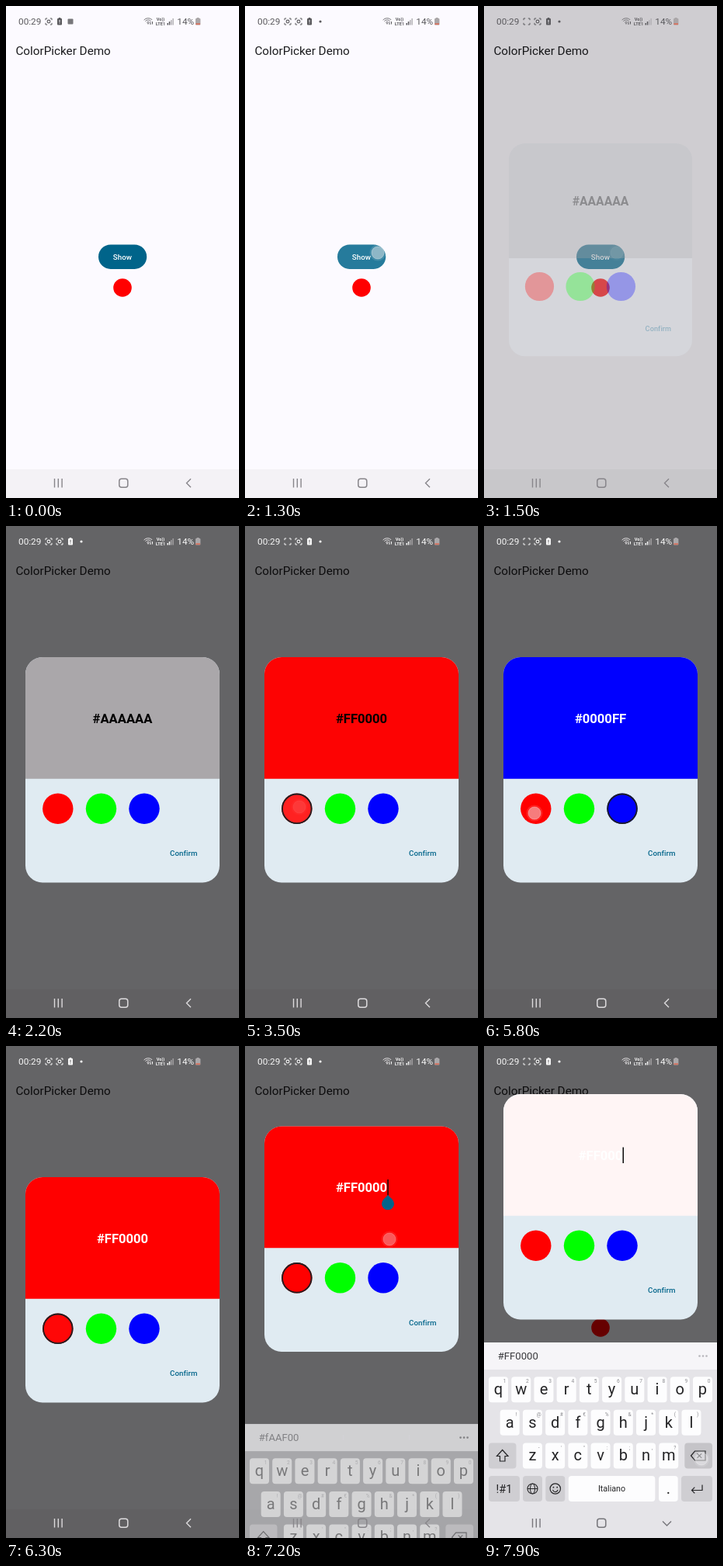
Animation, 300 px wide and 634 px high, one loop 8000 ms. Source, as an HTML page with a canvas:

```html
<!DOCTYPE html>
<html lang="en">
<head>
<meta charset="utf-8">
<title>Color picker</title>
<style>
html, body { margin: 0; width: 100%; height: 100%; overflow: hidden; background: #fcfaff; }
canvas { display: block; width: 300px; height: 634px; }
</style>
</head>
<body>
<canvas id="stage"></canvas>
<script>
const W = 300, H = 634, LOOP = 8000;
const canvas = document.getElementById('stage');
const ratio = window.devicePixelRatio || 1;
canvas.width = W * ratio;
canvas.height = H * ratio;
const c = canvas.getContext('2d');

const PRIMARY = '#00648a';
const RED = [255, 0, 0], BLUE = [0, 0, 255], GRAY = [170, 167, 170], WHITE = [255, 255, 255];
const DOTS = ['#ff0000', '#00ff00', '#0000ff'];
const DOT_X = [66.8, 122.5, 178];

// Each pick: start time, header colour, label, selected dot, label colour
const PICKS = [
  [0, GRAY, '#AAAAAA', -1, '#000'],
  [3350, RED, '#FF0000', 0, '#000'],
  [4650, BLUE, '#0000FF', 2, '#fff'],
  [5950, RED, '#FF0000', 0, '#fff'],
  [7770, WHITE, '#FF000', -1, '#fff']
];
const TAPS = [
  [1200, 171, 318], [3200, 70, 362], [4500, 180, 366],
  [5800, 65, 370], [7000, 186, 249], [7800, 280, 532]
];

const clamp = v => Math.max(0, Math.min(1, v));
const mix = (a, b, k) => a + (b - a) * k;
const rgb = a => `rgb(${a.map(Math.round).join(',')})`;

// Piecewise value sampled every 100 ms from a start time
function track(t, start, vals) {
  const p = (t - start) / 100;
  if (p < 0) return 0;
  const i = Math.floor(p);
  if (i >= vals.length - 1) return vals[vals.length - 1];
  return mix(vals[i], vals[i + 1], p - i);
}

// Critically damped spring: share of the way left
function springLeft(ms) {
  const x = 38.7 * ms / 1000;
  return (1 + x) * Math.exp(-x);
}

function text(s, x, y, size, color, weight = 400, align = 'left', spacing = 0) {
  c.font = `${weight} ${size}px Roboto, sans-serif`;
  c.letterSpacing = spacing + 'px';
  c.textAlign = align;
  c.fillStyle = color;
  c.fillText(s, x, y);
}
function rect(x, y, w, h, color) {
  c.fillStyle = color;
  c.fillRect(x, y, w, h);
}
function round(x, y, w, h, r, color) {
  c.beginPath();
  c.roundRect(x, y, w, h, r);
  c.fillStyle = color;
  c.fill();
}
function disc(x, y, r, color) {
  c.beginPath();
  c.arc(x, y, r, 0, 7);
  c.fillStyle = color;
  c.fill();
}
function ring(x, y, r, color, lw, a = 0, b = 2 * Math.PI) {
  c.beginPath();
  c.arc(x, y, r, a, b);
  stroke(color, lw);
}
function stroke(color, lw) {
  c.strokeStyle = color;
  c.lineWidth = lw;
  c.stroke();
}
function line(pts, color, lw, closed) {
  c.beginPath();
  for (let i = 0; i < pts.length; i += 2) c.lineTo(pts[i], pts[i + 1]);
  if (closed) c.closePath();
  stroke(color, lw);
}
function faded(alpha, draw) {
  c.save();
  c.globalAlpha *= alpha;
  draw();
  c.restore();
}

function captureIcon(x, col, dot) {
  for (const sx of [-1, 1]) for (const sy of [-1, 1]) {
    line([x + sx * 1.8, 20 + sy * 4, x + sx * 4, 20 + sy * 4, x + sx * 4, 20 + sy * 1.8], col, 1);
  }
  if (dot) ring(x, 20, 1.9, col, 1.1);
}
function batteryIcon(x, col, mark) {
  round(x - 3, 16, 6, 8.5, 1, col);
  rect(x - 1.3, 15, 2.6, 1.5, col);
  rect(x - 0.5, 18, 1, 2.8, mark);
  rect(x - 0.5, 21.6, 1, 1, mark);
}

function statusBar(t, dark) {
  const col = dark ? '#f6f6f6' : '#5b5a5e';
  const soft = dark ? '#e2e0e2' : '#77767a';
  const back = dark ? '#656366' : '#fcfaff';
  text('00:29', 16, 24, 11.8, col);
  const shift = 14 * track(t, 0, [0, 0.35, 0.8, 1]);
  const blink = t % 1000 < 500;
  captureIcon(55, col, blink);
  if (shift) faded(shift / 14, () => captureIcon(69, col, true));
  batteryIcon(69 + shift, col, back);
  if (shift < 14) faded(1 - shift / 14, () => round(79.5 + shift, 16.5, 7, 7, 1, soft));
  else disc(97, 20, 1.6, col);

  for (const r of [2.5, 5, 7.3]) ring(183, 23, r, soft, 1, -2.4, -0.75);
  disc(183, 22.5, 1, soft);
  line([186, 24, 186, 20.5], col, 1);
  line([188.5, 20, 188.5, 23.5], col, 1);
  text('Vo))', 199, 19.3, 5.6, col, 700, 'center');
  text('LTE1', 199, 25, 5.6, col, 700, 'center');
  for (let i = 0; i < 4; i++) {
    rect(207.5 + i * 2.3, 22 - i * 2, 1.5, 2.5 + i * 2, i < 2 ? col : (dark ? '#a09ea0' : '#b4b2b6'));
  }
  text('14%', 220.3, 24, 11.8, col);
  round(244, 16, 6.4, 8.6, 1, dark ? '#aaa8aa' : '#aaa6a8');
  rect(245.6, 15, 3, 1.4, dark ? '#aaa8aa' : '#aaa6a8');
  rect(244.4, 22.3, 5.6, 1.8, '#d9705c');
}

function navIcons(col, down) {
  for (const x of [62.5, 67.3, 72.1]) line([x, 609, x, 620.5], col, 1.4);
  c.beginPath();
  c.roundRect(145.8, 609.2, 11, 11, 3);
  stroke(col, 1.5);
  if (down) line([230, 612.5, 235.5, 618, 241, 612.5], col, 1.4);
  else line([238, 609.3, 232.5, 614.8, 238, 620.3], col, 1.4);
}

function page(t) {
  rect(0, 0, W, H, '#fcfaff');
  rect(0, 597, W, 37, '#f4f2f6');
  text('ColorPicker Demo', 12.4, 63, 15.28, '#1b1b1e');
  round(119, 307.5, 62.2, 31.4, 15.7, PRIMARY);
  const press = track(t, 1200, [0.08, 0.15, 0.12, 0]);
  if (press) round(119, 307.5, 62.2, 31.4, 15.7, `rgba(255,255,255,${press})`);
  text('Show', 150, 326.8, 9.72, '#fff', 500, 'center', 0.07);
  disc(150, 363, 11.8, '#ff0000');
}

function dialog(t) {
  const k = PICKS.findLastIndex(p => t >= p[0]);
  const [start, color, label, selected, ink] = PICKS[k];
  const from = PICKS[Math.max(0, k - 1)][1];
  const left = springLeft(t - start);
  const head = color.map((v, i) => mix(v, from[i], left));
  const x = 25, y = 169, w = 250, h = 290.5, r = 22;

  round(x, y, w, h, r, '#e0ebf2');
  round(x, y, w, 156.7, [r, r, 0, 0], rgb(head));
  text(label, 150, 253.8, 16.6, ink, 700, 'center');

  DOT_X.forEach((dx, i) => {
    disc(dx, 364.3, 19.7, DOTS[i]);
    if (k > 0 && k < 4 && selected === i) {
      const glow = 0.13 * (1 - clamp((t - start - 150) / 250));
      if (glow) disc(dx, 364.3, 19.7, `rgba(255,255,255,${glow})`);
      ring(dx, 364.3, 18.8, '#1d1d20', 1.8);
    }
  });
  text('Confirm', 211, 425.3, 9.72, PRIMARY, 500, 'left', 0.07);

  if (t >= 7100) {
    const cx = t < PICKS[4][0] ? 184 : 179.2;
    rect(cx - 0.7, 237.5, 1.5, 20.5, '#0a0a0a');
    if (t < PICKS[4][0]) {
      disc(184, 268.8, 8, PRIMARY);
      c.beginPath();
      c.moveTo(184, 257.6);
      c.lineTo(178.3, 263.2);
      c.lineTo(189.7, 263.2);
      c.fill();
    }
  }
}

const KEY = '#fdfdfe', FN = '#cfced2', INK = '#242426';

function keyRow(letters, hints, x0, cy) {
  [...letters].forEach((ch, i) => {
    const x = x0 + i * 29.22;
    round(x - 12.5, cy - 16.5, 25, 33, 4, KEY);
    text(ch, x, cy + 6.3, 20, INK, 400, 'center');
    text(hints[i], x + 8.2, cy - 8.5, 6.6, '#8c8c90', 400, 'center');
  });
}

function keyboard(t) {
  rect(0, 382, W, 252, '#e5e4e8');
  rect(0, 382, W, 35, '#f6f5f8');
  const early = t < 7400;
  text(early ? '#fAAF00' : '#FF0000', 17.8, 403.7, 13.1, '#3a3a3d');
  for (const x of [277.5, 282, 286.5]) disc(x, 399.5, 1.3, early ? '#3c3c40' : '#b6b5ba');
  if (early) for (const x of [126, 211]) rect(x, 396, 0.8, 7, '#d8d6da');

  keyRow('qwertyuiop', '1234567890', 18.5, 442.7);
  keyRow('asdfghjkl', '!@#€%&*()', 33.2, 485.3);
  keyRow('zxcvbnm', '-\'":;,?', 62.4, 528);

  round(6, 511.5, 35.5, 33, 4, FN);
  line([23.7, 520.5, 16.5, 528.5, 20.5, 528.5, 20.5, 535, 27, 535, 27, 528.5, 31, 528.5], INK, 1.2, true);
  round(258.3, 511.5, 35.7, 33, 4, t >= 7800 ? '#c5c4c8' : FN);
  line([266.5, 528, 271.5, 522, 285, 522, 285, 534, 271.5, 534], INK, 1.2, true);
  line([274.5, 525.2, 280.2, 530.9], INK, 1.1);
  line([280.2, 525.2, 274.5, 530.9], INK, 1.1);

  const y = 554, cy = 570.5;
  round(6, y, 40, 33, 4, FN);
  text('!#1', 26, cy + 5.3, 14.6, INK, 400, 'center');
  round(50, y, 25, 33, 4, FN);
  ring(62.5, cy, 6.5, INK, 1.1);
  c.beginPath();
  c.ellipse(62.5, cy, 3, 6.5, 0, 0, 7);
  stroke(INK, 1);
  line([56, cy, 69, cy], INK, 1);
  round(79.3, y, 25, 33, 4, FN);
  ring(91.8, cy, 6.7, INK, 1.2);
  disc(89.4, cy - 1.8, 0.9, INK);
  disc(94.2, cy - 1.8, 0.9, INK);
  ring(91.8, cy + 0.8, 3.3, INK, 1.1, 0.2, 2.94);
  round(108.8, y, 111.5, 33, 4, KEY);
  text('Italiano', 164.5, cy + 3.8, 10.7, INK, 400, 'center');
  round(225, y, 24.7, 33, 4, KEY);
  text('.', 237.4, cy + 6.5, 20, INK, 400, 'center');
  round(254, y, 40, 33, 4, FN);
  line([281, 565.5, 281, 572.5, 267.5, 572.5], INK, 1.2);
  line([271.3, 568.7, 267.5, 572.5, 271.3, 576.3], INK, 1.2);
}

function touches(t) {
  for (const [start, x, y] of TAPS) {
    const a = t < start ? 0 : track(t, start, [1, 1, 0.7, 0.2, 0]);
    if (!a) continue;
    disc(x, y, 10.5, `rgba(255,255,255,${0.13 * a})`);
    disc(x, y, 8, `rgba(235,235,238,${0.45 * a})`);
    ring(x, y, 8, `rgba(255,255,255,${0.3 * a})`, 1);
  }
}

function draw(t) {
  c.setTransform(ratio, 0, 0, ratio, 0, 0);
  page(t);
  const open = track(t, 1400, [0, 0.3, 0.8, 1]);
  const dark = open > 0.5;
  if (open) rect(0, 0, W, H, `rgba(0,0,0,${0.6 * open})`);
  statusBar(t, dark);
  navIconsUnder(t, dark);

  if (open) {
    const lift = 107 * track(t, 7000, [0, 0.15, 0.612, 0.88, 0.97, 1]);
    c.save();
    const s = mix(0.92, 1, open);
    c.translate(150, 314 - lift);
    c.scale(s, s);
    c.translate(-150, -314);
    faded(open, () => dialog(t));
    c.restore();
  }

  const rise = track(t, 7000, [0, 0.12, 0.583, 0.87, 0.97, 1]);
  if (rise) {
    const show = track(t, 7000, [0, 0.1, 0.52, 0.85, 1]);
    c.save();
    c.translate(0, 252 * (1 - rise));
    faded(show, () => keyboard(t));
    c.restore();
    navIcons(rise > 0.8 ? '#77767b' : '#88868a', rise > 0.8);
  }
  touches(t);
}

function navIconsUnder(t, dark) {
  if (t < 7100) navIcons(dark ? '#dddbdd' : '#87858a', false);
}

function frame(now) {
  draw(Math.floor((now % LOOP) / 100) * 100);
  requestAnimationFrame(frame);
}
draw(0);
requestAnimationFrame(frame);
</script>
</body>
</html>
```
